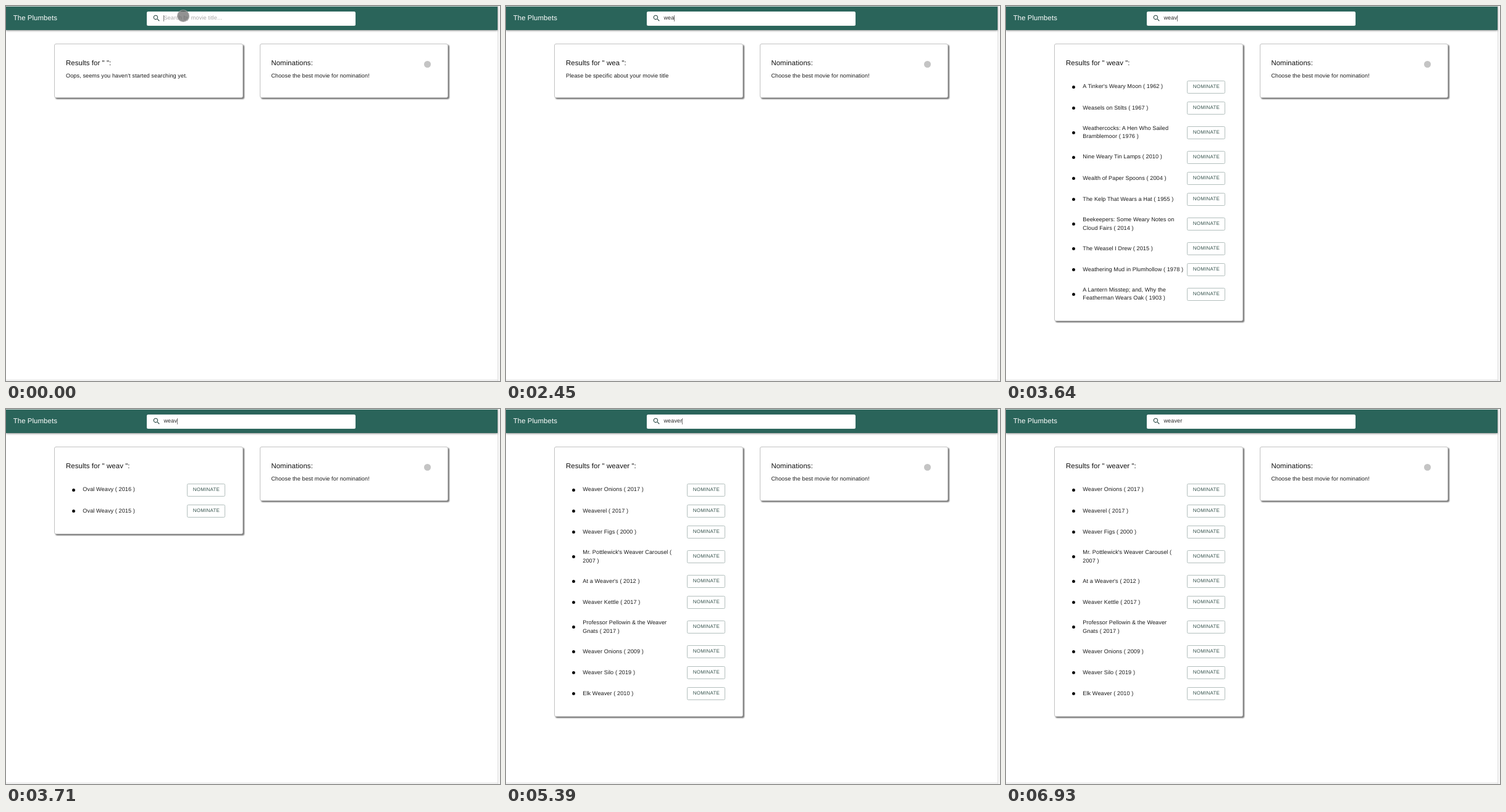
An HTML page for the animation above (7 s loop, 800 by 608 pixels).

```html
<!DOCTYPE html>
<html lang="en">
<head>
<meta charset="utf-8">
<title>Movie nominations</title>
<style>
  html, body { margin: 0; width: 100%; height: 100%; overflow: hidden; background: #fff; }
  #stage {
    position: absolute; left: 0; top: 0; width: 800px; height: 608px; overflow: hidden;
    font: 9.13px/13.7px "Liberation Sans", Arial, sans-serif;
    letter-spacing: .00938em; color: #1b1b1b; background: #fff;
    text-rendering: geometricPrecision;
  }
  #stage * { box-sizing: border-box; }
  .abs, header, .card, .card h2, .card p, .field { position: absolute; margin: 0; }
  header {
    left: 0; top: 0; width: 796px; height: 38.5px; background: #2a645a;
    border-top: 1px solid #d5dcda; box-shadow: 0 1px 3px rgba(0, 0, 0, .45);
  }
  .rail { left: 796px; top: 0; width: 4px; height: 608px; background: #f6f6f6; border-left: 1px solid #dedede; }
  .floor { left: 0; top: 606px; width: 797px; height: 1px; background: #dcdcdc; }
  h1, h2 { font-size: 11.4px; font-weight: 400; line-height: 18px; letter-spacing: .0075em; white-space: nowrap; }
  h1 { left: 11.7px; top: 11px; color: #fff; }
  .field {
    left: 228px; top: 9px; width: 338px; height: 23px; border-radius: 2.5px;
    background: #fff; box-shadow: 0 0 1px rgba(255, 255, 255, .5);
  }
  .field svg { position: absolute; left: 9.2px; top: 3.7px; width: 13.7px; height: 13.7px; fill: #2c4a45; }
  .entry { left: 27.4px; top: 4px; display: flex; white-space: pre; color: #2b2b2b; }
  .caret { width: 1px; height: 10px; margin: 2px -1px 0 0; background: #777; }
  .hint { color: #a9a9a9; }
  .pointer {
    left: 276.5px; top: 6px; width: 20px; height: 20px; border-radius: 50%;
    background: rgba(95, 95, 95, .68); border: 1px solid rgba(175, 175, 175, .8);
  }
  .card {
    top: 61px; width: 305.4px; min-height: 88px; border: 1px solid #c2c2c2; border-radius: 3px;
    background: #fff; box-shadow: 2px 2px 2px #777;
  }
  .card h2 { left: 17.7px; top: 22px; color: #111; }
  .card p { left: 17.7px; top: 45px; white-space: nowrap; }
  ul { margin: 52.2px 0 19.6px; padding: 0; list-style: none; }
  li {
    position: relative; display: flex; align-items: center; min-height: 34.2px;
    padding: 9.1px 0 9.1px 45px; white-space: pre;
  }
  li::before {
    content: ""; position: absolute; left: 27.9px; top: calc(50% - 2.5px);
    width: 5px; height: 5px; border-radius: 50%; background: #111;
  }
  li b {
    position: absolute; left: 214.2px; top: calc(50% - 10.4px); width: 62px; height: 20.8px;
    border: 1px solid #b3bfbd; border-radius: 2.3px; background: #fff; color: #35524c;
    font: 7.98px/18.8px "Liberation Sans", Arial, sans-serif; letter-spacing: .02857em; text-align: center;
  }
  .badge { left: 265.5px; top: 26.5px; width: 11px; height: 11px; border-radius: 50%; background: #c4c4c4; }
</style>
</head>
<body>
<div id="stage">
  <div class="abs rail"></div>
  <div class="abs floor"></div>
  <header></header>
  <h1 class="abs">The Plumbets</h1>
  <div class="field">
    <svg viewBox="0 0 24 24"><path fill-rule="evenodd" d="M15.5 14h-.8l-.3-.3A6.5 6.5 0 1 0 13.7 14.4l.3.3v.8l5 5 1.5-1.5zM9.5 14a4.5 4.5 0 1 1 0-9 4.5 4.5 0 0 1 0 9z"/></svg>
    <div class="abs entry"><span id="typed"></span><i class="caret" id="caret"></i><span class="hint" id="hint">Search by movie title...</span></div>
  </div>
  <section class="card" id="results" style="left:78.3px">
    <h2 id="heading"></h2>
    <p id="message"></p>
  </section>
  <section class="card" style="left:410.7px">
    <h2>Nominations:</h2>
    <p>Choose the best movie for nomination!</p>
    <div class="abs badge"></div>
  </section>
  <div class="abs pointer" id="pointer"></div>
</div>
<script>
  const LOOP = 7000;
  const $ = id => document.getElementById(id);

  // Each entry holds from its start time until the next one.
  const queries = [[0, ""], [910, "w"], [1750, "we"], [2450, "wea"], [3640, "weav"], [4270, "weave"], [5110, "weaver"]];
  const messages = [[0, "Oops, seems you haven't started searching yet."], [910, "Please be specific about your movie title"], [2870, ""]];
  const pointerFade = [[0, 1], [910, .3], [980, 0]];
  const caretOn = [[0, 140], [700, 1470], [1750, 2310], [2450, 3080], [3640, 4060], [4270, 4690], [5110, 5670], [6020, 6580]];

  const lists = [
    [2870, [
      "A Tinker's Weary Moon ( 1962 )",
      "Weasels on Stilts ( 1967 )",
      "Weathercocks: A Hen Who Sailed\nBramblemoor ( 1976 )",
      "Nine Weary Tin Lamps ( 2010 )",
      "Wealth of Paper Spoons ( 2004 )",
      "The Kelp That Wears a Hat ( 1955 )",
      "Beekeepers: Some Weary Notes on\nCloud Fairs ( 2014 )",
      "The Weasel I Drew ( 2015 )",
      "Weathering Mud in Plumhollow ( 1978 )",
      "A Lantern Misstep; and, Why the\nFeatherman Wears Oak ( 1903 )"
    ]],
    [3710, ["Oval Weavy ( 2016 )", "Oval Weavy ( 2015 )"]],
    [5250, [
      "Weavelings ( 2013 )",
      "The Turnip Weave ( 2008 )",
      "Weavemere: Eleven Small Stories\nAbout Yarn ( 2011 )",
      "Weaved by Owls ( 1998 )",
      "Grandfather Pimm and the Basket\nWeave Society of Upper\nThistlecombe ( 2005 )",
      "Soup Weave ( 2016 )",
      "Weave Me a Pond ( 1989 )",
      "The Lopsided Weave: A Journey\nthrough Wool ( 2012 )",
      "Six Quiet Evenings of Rug Weave\nwith the Marrowby Sisters and\nTheir Goat ( 1974 )",
      "Weavedale ( 2018 )"
    ]],
    [5390, [
      "Weaver Onions ( 2017 )",
      "Weaverel ( 2017 )",
      "Weaver Figs ( 2000 )",
      "Mr. Pottlewick's Weaver Carousel (\n2007 )",
      "At a Weaver's ( 2012 )",
      "Weaver Kettle ( 2017 )",
      "Professor Pellowin & the Weaver\nGnats ( 2017 )",
      "Weaver Onions ( 2009 )",
      "Weaver Silo ( 2019 )",
      "Elk Weaver ( 2010 )"
    ]]
  ];

  function buildList(titles) {
    const ul = document.createElement("ul");
    for (const title of titles) {
      const li = document.createElement("li");
      const button = document.createElement("b");
      button.textContent = "NOMINATE";
      li.append(title, button);
      ul.append(li);
    }
    $("results").append(ul);
    return ul;
  }

  const panels = [[0, null], ...lists.map(([start, titles]) => [start, buildList(titles)])];

  const at = (steps, t) => steps.filter(([start]) => start <= t).pop()[1];

  function draw(t) {
    const query = at(queries, t);
    const panel = at(panels, t);
    $("typed").textContent = query;
    $("heading").textContent = `Results for " ${query} ":`;
    $("message").textContent = at(messages, t);
    $("hint").hidden = query !== "";
    $("caret").style.opacity = caretOn.some(([from, to]) => t >= from && t < to) ? 1 : 0;
    $("pointer").style.opacity = at(pointerFade, t);
    for (const [, ul] of panels) if (ul) ul.hidden = ul !== panel;
  }

  const begin = performance.now();
  function tick() {
    draw((performance.now() - begin) % LOOP);
    requestAnimationFrame(tick);
  }
  tick();
</script>
</body>
</html>
```
